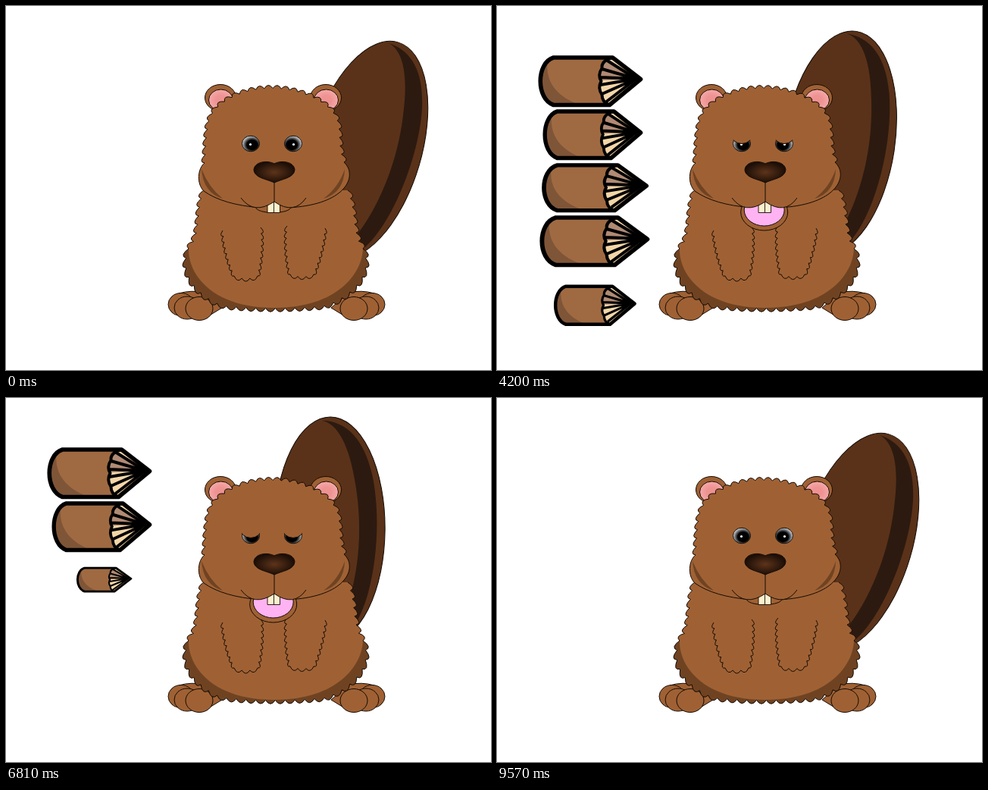
Recreate the animation shown at these times as an HTML page. Size 640 by 480 pixels, loop 9.6 s.

```html
<!DOCTYPE html>
<html lang="en">
<head>
<meta charset="utf-8">
<title>Beaver counting logs</title>
<style>
html, body { margin: 0; width: 100%; height: 100%; overflow: hidden; background: #fff; }
svg { display: block; width: 640px; height: 480px; }
.line { fill: none; stroke: #140b05; }
.fur { fill: #9f6134; }
.dark { fill: #6f4322; }
.edge { stroke: #140b05; }
</style>
</head>
<body>
<svg id="stage" viewBox="0 0 640 480"></svg>
<script>
const stage = document.getElementById('stage');
const FRAME = 30, COUNT = 320;

// Replaces a smooth curve by a row of drooping tufts on its outer side (1 left, -1 right
// of the direction of travel); the result lacks its first letter.
function fur(d, step, side) {
  const curve = document.createElementNS('http://www.w3.org/2000/svg', 'path');
  curve.setAttribute('d', d);
  const length = curve.getTotalLength(), n = Math.round(length / step);
  let p = curve.getPointAtLength(0), out = `${p.x} ${p.y}`;
  for (let i = 1; i <= n; i++) {
    const q = curve.getPointAtLength(length * i / n);
    const dx = q.x - p.x, dy = q.y - p.y, lean = 0.5 + 0.45 * dy / Math.hypot(dx, dy);
    const cx = p.x + dx * lean + dy * side * 0.75, cy = p.y + dy * lean - dx * side * 0.75;
    out += `Q${cx.toFixed(1)} ${cy.toFixed(1)} ${q.x.toFixed(1)} ${q.y.toFixed(1)}`;
    p = q;
  }
  return out;
}
const path = (d, cls, more = '') => `<path d="${d}" class="${cls}" ${more}/>`;
const oval = (x, y, rx, ry, cls, more = '') =>
  `<ellipse cx="${x}" cy="${y}" rx="${rx}" ry="${ry}" class="${cls}" ${more}/>`;

function foot() {
  return path('M228 379Q245 374 262 378L285 398L262 412Z', 'fur edge') +
    oval(231, 393.5, 17, 15, 'fur edge') +
    oval(239, 398, 17, 15, 'fur edge') +
    oval(255, 399, 18, 15.5, 'fur edge');
}
const ear = x => oval(x, 121, 20.5, 17.5, 'fur edge') +
  oval(x + 0.5, 124, 16, 14, 'edge', 'fill="url(#ear)"');

const eye = (x, flip) => `<g transform="translate(${x} 181.5) scale(${flip} 1)">` +
  oval(0, 0, 11.5, 10.3, 'edge', 'fill="url(#eye)"') +
  '<circle cx="-.5" cy="1" r="1.6" fill="#fff"/><g clip-path="url(#socket)">' +
  oval(0, -30, 15, 14, 'fur edge lid') + '</g></g>';

function arm(left, right, paw) {
  return path('M' + fur(left, 8, -1), 'line') + path('M' + fur(right, 8, 1), 'line') +
    path('M' + fur(paw, 11, -1), 'line');
}

function body() {
  const left = fur('M261 243C249 275 259 300 241 320', 12, -1);
  const right = fur('M471 320C456 300 463 275 451 243', 12, -1);
  const under = fur('M241 320C229 350 247 379 285 395Q354 402 423 395C463 379 484 350 471 320', 13, -1);
  const belly = 'C240 352 270 398 354 398C438 398 470 352 471 320';
  return path('M' + under + 'Z', 'dark edge') +
    path('M' + left + belly + 'L' + right + 'Z', 'fur') +
    path('M' + left, 'line') + path('M' + right, 'line');
}

function head() {
  const top = fur('M262 207C264 185 264 160 270 146C277 130 300 117 322 112' +
    'Q350 105 380 112C408 119 429 132 436 148C443 165 437 185 446 206', 11, 1);
  const rightJaw = 'C464 222 452 262 372 266';
  const jaw = rightJaw + 'L330 266Q286 262 261 244C251 234 253 214 262 207';
  return path('M' + top + jaw + 'Z', 'fur') + path('M' + top, 'line') +
    path('M446 206' + rightJaw, 'line') +
    path('M262 207C253 214 251 234 261 244Q286 262 336 266', 'line') +
    path('M258 215Q260 246 286 254Q268 240 258 215Z', 'dark') +
    path('M447 215Q446 246 419 254Q439 239 447 215Z', 'dark');
}

function face() {
  const smile = 'M310 253Q327 276 354 258Q380 276 396 253';
  return oval(352.7, 0, 0, 0, 'fur edge', 'id="lip"') +
    oval(352.7, 0, 0, 0, 'edge', 'id="tongue" fill="#ffb3f2"') +
    path('M345 257H361.5V272.5H345ZM353.5 257V272.5', 'edge', 'fill="#fff1cd" stroke-width=".9"') +
    path(smile + 'V240H310Z', 'fur') + path(smile + 'M354 232V258', 'line') +
    path('M354 208C345 203 328 205 327 216C328 227 344 228 354 233' +
      'C364 228 380 227 381 216C380 205 363 203 354 208Z', 'edge', 'fill="url(#nose)"') +
    eye(323, 1) + eye(379, -1);
}

const tail = '<g id="tail">' +
  oval(475, 190, 73, 148.3, 'edge', 'fill="#5a3219" transform="rotate(16.6 475 190)"') +
  path('M505 49C530 62 528 110 525 135C518 210 488 270 462 303L474 318' +
    'C510 285 545 200 549 135C551 90 538 60 505 49Z', '', 'fill="#2c1a10"') + '</g>';

// Center and size of each log; the artwork is drawn 137 by 68 around 0,0.
const logs = [
  [123.5, 99, 137, 68], [126.5, 169.5, 131, 67], [129.7, 239.5, 140, 65],
  [129, 310, 144, 68], [129.5, 394.5, 145, 73]
];
const bark = 'M-49 -31C-72 -24 -72 24 -49 31.5H25L66 -2.5L29 -31Z';
const splits = 'M29 -31Q14 -27 15 -17Q9 -8 14 0Q9 9 15 18Q15 28 25 31.5';
const logArt = path(bark, '', 'fill="#9f6a42"') +
  path('M-57 -26C-60 5 -40 22 -15 31H-49C-69 25 -70 -18 -57 -26Z', '', 'fill="#7f5538"') +
  path(splits + 'L65 -2.5Z', '', 'fill="#b08a74"') +
  path('M13 -1L65 -2.5L25 31Q15 28 15 18Q9 9 13 -1ZM29 -31L65 -2.5L21 -27Z', '', 'fill="#f3d6a8"') +
  path(splits + 'M22 -27L60 -3L15 -16M13 -5L60 -3L13 5M15 17L60 -3L21 27', '',
    'fill="none" stroke="#000" stroke-width="4" stroke-linejoin="round"') +
  path(bark, '', 'fill="none" stroke="#000" stroke-width="5.6" stroke-linejoin="round"');

stage.innerHTML = `<defs>
  <radialGradient id="ear"><stop offset=".4" stop-color="#ee9292"/><stop offset="1" stop-color="#f6a9a9"/></radialGradient>
  <radialGradient id="eye" cx=".58" cy=".58" r=".62"><stop offset=".5" stop-color="#000"/>
    <stop offset=".78" stop-color="#85898d"/><stop offset="1" stop-color="#f0f3f5"/></radialGradient>
  <radialGradient id="nose"><stop offset="0" stop-color="#5e341a"/><stop offset="1" stop-color="#1c0e07"/></radialGradient>
  <clipPath id="socket"><ellipse rx="12.6" ry="11.4"/></clipPath></defs>` +
  tail + foot() + `<g transform="matrix(-1 0 0 1 714 0)">${foot()}</g>` + body() +
  arm('M286 296Q288 324 301 356', 'M336 292Q339 322 332 356', 'M301 356Q316 363 332 356') +
  arm('M371 290Q368 322 375 354', 'M421 293Q418 322 406 354', 'M375 354Q391 360 406 354') +
  ear(283) + ear(422) + head() + face() +
  logs.map(() => `<g class="log">${logArt}</g>`).join('');

const pick = id => document.getElementById(id);
const lids = document.querySelectorAll('.lid'), logNodes = document.querySelectorAll('.log');

// Pairs of frame and value, joined by straight segments.
function track(keys, f) {
  if (f <= keys[0][0]) return keys[0][1];
  for (let i = 1; i < keys.length; i++) {
    const [a, u] = keys[i - 1], [b, v] = keys[i];
    if (f <= b) return u + (v - u) * (f - a) / (b - a);
  }
  return keys[keys.length - 1][1];
}
const swing = [[60, 0], [119, -18], [127, -16.5], [140, -8], [160, 12], [168, 18],
  [193, 2], [196, 0], [226, -16], [239, -18.3], [262, -13], [293, -6.3], [319, 0]];
const lidDrop = [[29, -12], [45, -1], [95, 5], [119, 6], [140, 0], [170, -7],
  [196, -5], [239, 6], [262, 4], [319, -12]];
const gape = [[0, 0], [5, 1], [314, 1], [319, 0]];

function logScale(i, f) {
  const grow = 29 + 30 * (i - 1), shrink = 150 + 30 * (4 - i);
  if (f < Math.max(29, grow) || f >= shrink + 30) return 0;
  if (f >= shrink) return 1 - 0.845 * (f - shrink) / 30;
  return i ? Math.min(1, 0.155 + 0.845 * (f - grow) / 30) : 1;
}

function setOval(id, cy, rx, ry) {
  const node = pick(id);
  node.setAttribute('cy', cy);
  node.setAttribute('rx', rx);
  node.setAttribute('ry', ry);
}

function draw(f) {
  pick('tail').setAttribute('transform', `rotate(${track(swing, f)} 392 350)`);

  const open = track(gape, f);
  setOval('lip', 265.5 + 6.5 * open, 23 + 8 * open, 7 + 17 * open);
  setOval('tongue', 265.5 + 3.5 * open, 26.5 * open, 21 * open);

  const drop = track(lidDrop, f);
  lids.forEach(lid => lid.setAttribute('cy', drop - 14));

  logNodes.forEach((node, i) => {
    const s = logScale(i, f), [x, y, w, h] = logs[i];
    node.style.display = s ? '' : 'none';
    node.setAttribute('transform', `translate(${x} ${y}) scale(${s * w / 137} ${s * h / 68})`);
  });
}

const start = performance.now();
function tick() {
  draw(Math.floor((performance.now() - start) / FRAME) % COUNT);
  requestAnimationFrame(tick);
}
tick();
</script>
</body>
</html>
```
